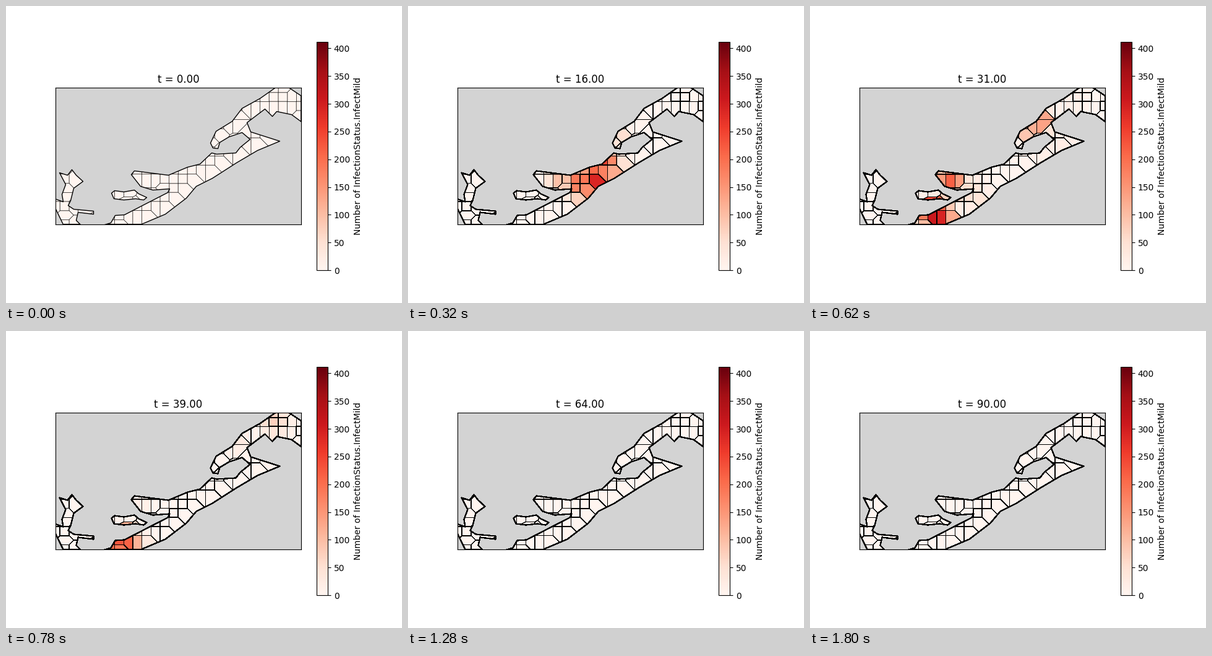
Recreate the animation shown at these times as a matplotlib script. Size 640 by 480 pixels, loop 1.82 s.

```python
import numpy as np
import matplotlib.pyplot as plt
from matplotlib.animation import FuncAnimation
from matplotlib.cm import ScalarMappable
from matplotlib.collections import PathCollection
from matplotlib.colors import Normalize
from matplotlib.path import Path

FRAMES, STEP_MS = 91, 20
VMAX = 412
LEFT, RIGHT, TOP, BOTTOM = 80, 476.8, 132.2, 352.6
COLS, ROWS = 28, 16
PITCH = (RIGHT - LEFT) / (COLS - 1)
MAX_LAYERS = 40

# Corners of the coastlines, in stage pixels
MAINLAND = [
    (440, 128), (410, 149), (381, 165), (365, 186), (339, 202), (330, 221),
    (334, 229), (342, 230), (345, 220), (360, 211), (381, 204), (394, 215),
    (378, 228), (371, 237), (340, 239), (332, 237), (313, 255), (293, 260),
    (262, 273), (207, 266), (202, 272), (217, 291), (237, 297), (264, 295),
    (261, 301), (222, 321), (191, 337), (176, 338), (169, 350), (126, 363),
    (193, 363), (257, 336), (291, 310), (307, 291), (333, 278), (372, 253),
    (406, 233), (442, 218), (395, 203), (389, 188), (418, 166), (430, 178),
    (437, 170), (461, 175), (495, 200), (495, 157), (453, 129)]
ISLAND = [
    (170, 302), (175, 298), (190, 300), (207, 297), (214, 303), (227, 309),
    (222, 313), (209, 311), (190, 313), (174, 311)]
WEST = [
    (74, 309.5), (92, 316), (90, 304), (96, 288), (86, 269), (99, 273),
    (106, 264), (113, 273), (124, 283), (109, 294), (104, 314), (100, 322),
    (109, 328), (141, 331), (141, 336), (116, 333), (113, 346), (130, 363),
    (97, 363), (74, 315.5)]

# The wave starts at SOURCE and flares up around hubs (column, row, count)
SOURCE = (15.5, 9)
HUBS = [(16, 8, 250), (15, 10, 290), (13, 10.7, 300), (10.6, 10, 380),
        (8.2, 14, 370), (6.5, 14, 310), (18.3, 4.8, 220), (19.5, 3.7, 165),
        (24, 0.5, 80)]


def closed(points):
    return Path(np.vstack([points, points[:1]]), closed=True)


def clip(poly, normal, limit):
    """Keep the part of a convex polygon where p . normal <= limit."""
    out = []
    for a, b in zip(poly, np.roll(poly, -1, axis=0)):
        da, db = a @ normal - limit, b @ normal - limit
        if da <= 0:
            out.append(a)
        if da * db < 0:
            out.append(a + (b - a) * da / (da - db))
    return np.array(out)


def voronoi(points, box):
    cells = []
    for p in points:
        cell = box
        for q in points:
            if q is not p:
                cell = clip(cell, q - p, (q @ q - p @ p) / 2)
        cells.append(closed(cell))
    return cells


def to_stage(grid):
    return grid * PITCH + (LEFT, TOP)


def on_any(paths, points):
    return np.any([p.contains_points(points) for p in paths], axis=0)


box = np.array([(LEFT, TOP), (RIGHT, TOP), (RIGHT, BOTTOM), (LEFT, BOTTOM)])
coasts = [closed(np.array(c) + 0.5) for c in (MAINLAND, ISLAND, WEST)]
land = Path.make_compound_path(*coasts)

# A grid square counts if its middle is on land; its corner seeds a cell
grid = np.array([(c, r) for r in range(ROWS) for c in range(COLS)])
sites = grid[on_any(coasts, to_stage(grid + 0.52))]
cells = voronoi(list(to_stage(sites)), box)
inland = [c for c in cells if on_any(coasts, c.vertices).all()]
coastal = [c for c in cells if c not in inland]

dist = np.hypot(*(sites - SOURCE).T)
peak = 14 + 2.2 * dist
count = 40 * np.exp(-(dist / 9) ** 2)
for col, row, size in HUBS:
    gap = ((sites - (col, row)) ** 2).sum(axis=1)
    count = np.maximum(count, size * np.exp(-gap / 3))

fig, ax = plt.subplots(figsize=(6.4, 4.8), dpi=100)
ax.set(xlim=(LEFT, RIGHT), ylim=(BOTTOM, TOP), aspect="equal",
       xticks=[], yticks=[], facecolor="lightgray")
mapper = ScalarMappable(Normalize(0, VMAX), "Reds")
fig.colorbar(mapper, ax=ax, label="Number of InfectionStatus.InfectMild")
title = ax.set_title("")


def add_paths(paths, on_land=True, snap=False, **style):
    coll = PathCollection(paths, **style)
    coll.set_transform(ax.transData)
    coll.set_snap(snap)
    ax.add_collection(coll, autolim=False)
    if on_land:
        coll.set_clip_path(land, ax.transData)
    return coll


def add_lines(paths, width, **options):
    return paths, add_paths(paths, facecolors="none", edgecolors="black",
                            linewidths=width, zorder=2, **options)


fills = add_paths(cells, edgecolors="none", zorder=1)
lines = [add_lines(coastal, 0.3), add_lines(inland, 0.3, snap=None),
         add_lines([closed(box)], 0.8), add_lines(coasts, 1, on_land=False)]


def update(t):
    title.set_text(f"t = {t:.2f}")
    infected = count * np.exp(-((t - peak) / 5) ** 2 / 2)
    fills.set_facecolor(mapper.to_rgba(infected))
    # Strokes pile up with each step, so soft edges darken
    for paths, coll in lines:
        coll.set_paths(paths * min(t + 1, MAX_LAYERS))
    return title, fills


anim = FuncAnimation(fig, update, frames=FRAMES, interval=STEP_MS,
                     repeat=True, repeat_delay=0, blit=False)
plt.show()
```
